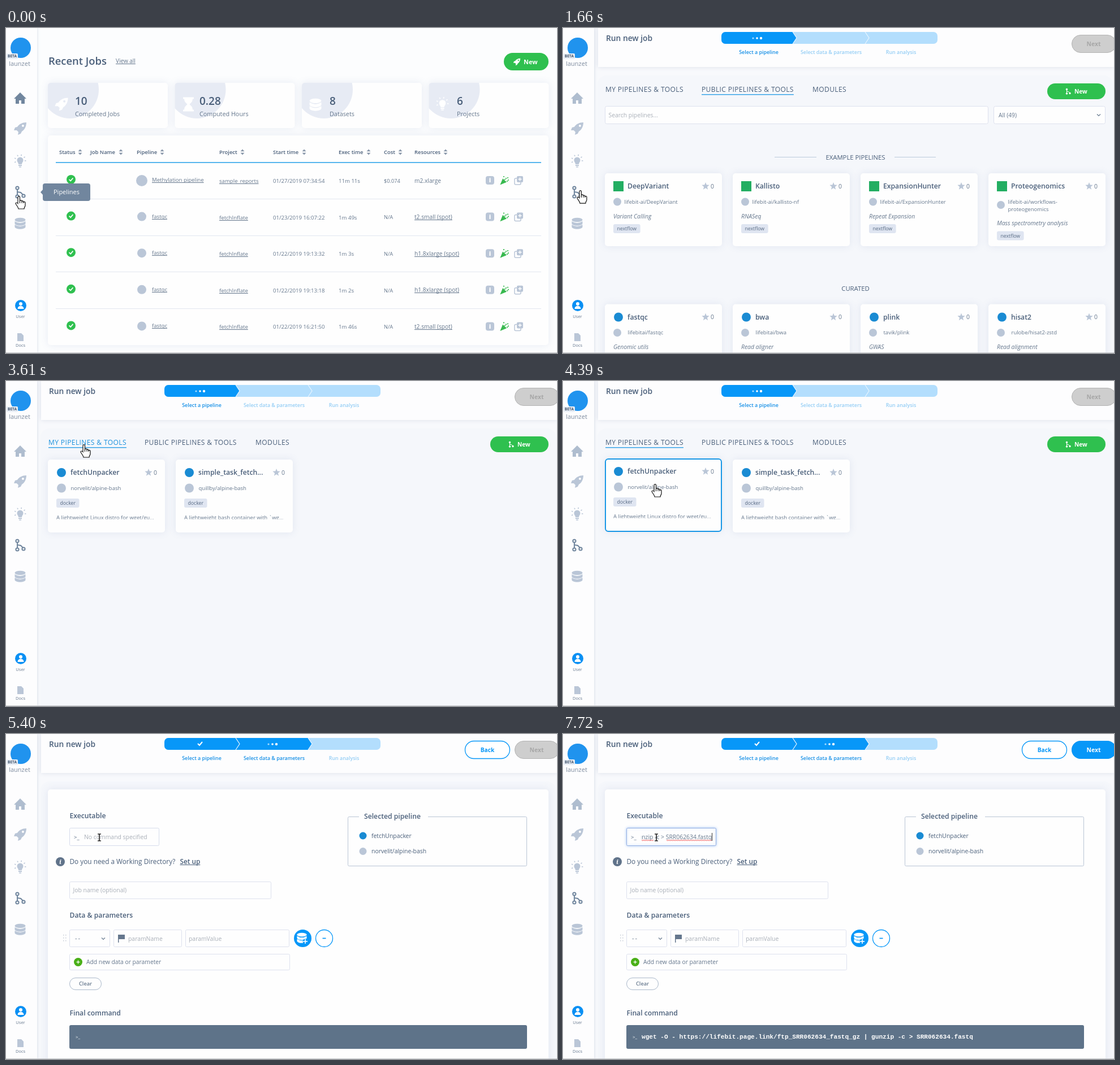
An HTML page with a canvas that plays this animation: 974 px wide and 575 px high, repeating every 8 s.

```html
<!DOCTYPE html>
<html lang="en">
<head>
<meta charset="utf-8">
<title>Run new job</title>
<style>
html, body { margin: 0; width: 100%; height: 100%; overflow: hidden; background: #fff; }
canvas { display: block; width: 974px; height: 575px; }
</style>
</head>
<body>
<canvas id="stage" width="974" height="575"></canvas>
<script>
const ctx = document.getElementById('stage').getContext('2d');
const LOOP = 8000;
const BLUE = '#0797f8', PALE_BLUE = '#b3defd', GREEN = '#2fc04f', INK = '#4a5f7a',
  BODY = '#65778d', LIGHT = '#bac6d7', DARK = '#71869e', HINT = '#a9afb8', EDGE = '#dde1ee';

const clamp = v => Math.max(0, Math.min(1, v));
const mix = (a, b, p) => a + (b - a) * p;
// Screen updates arrive in n even steps: 1/n at start, 1 at end.
const steps = (t, start, end, n) => t < start ? 0 :
  clamp((Math.floor((t - start) / (end - start) * (n - 1) + 0.1) + 1) / n);

function text(s, x, y, size, color, o = {}) {
  ctx.font = `${o.italic ? 'italic ' : ''}${o.weight || 400} ${size}px ${o.family || '"Open Sans", sans-serif'}`;
  ctx.letterSpacing = (o.spacing || 0) + 'px';
  ctx.textAlign = o.align || 'left';
  ctx.fillStyle = color;
  const base = y + size * 0.36;
  ctx.fillText(s, x, base);
  const w = ctx.measureText(s).width;
  if (o.underline) rect(x, Math.round(base + 1), w, 1, color);
  ctx.letterSpacing = '0px';
  return w;
}
function rect(x, y, w, h, color) {
  ctx.fillStyle = color;
  ctx.fillRect(x, y, w, h);
}
function box(x, y, w, h, r, fill, stroke, width = 1) {
  ctx.beginPath();
  ctx.roundRect(x, y, w, h, r);
  if (fill) { ctx.fillStyle = fill; ctx.fill(); }
  if (stroke) { ctx.strokeStyle = stroke; ctx.lineWidth = width; ctx.stroke(); }
}
function disc(x, y, r, fill, stroke, width = 1) {
  ctx.beginPath();
  ctx.arc(x, y, r, 0, 7);
  if (fill) { ctx.fillStyle = fill; ctx.fill(); }
  if (stroke) { ctx.strokeStyle = stroke; ctx.lineWidth = width; ctx.stroke(); }
}
function line(color, width, ...pts) {
  ctx.beginPath();
  for (let i = 0; i < pts.length; i += 2) ctx.lineTo(pts[i], pts[i + 1]);
  ctx.strokeStyle = color;
  ctx.lineWidth = width;
  ctx.stroke();
}
function place(x, y, scale, draw) {
  ctx.save();
  ctx.translate(x, y);
  ctx.scale(scale, scale);
  draw();
  ctx.restore();
}
function faded(alpha, draw) {
  if (alpha <= 0) return;
  ctx.save();
  ctx.globalAlpha *= clamp(alpha);
  draw();
  ctx.restore();
}
function card(x, y, w, h, r = 5) {
  ctx.save();
  ctx.shadowColor = 'rgba(90,115,170,.13)';
  ctx.shadowBlur = 14;
  box(x, y, w, h, r, '#fefefe');
  ctx.restore();
}

const shapes = {
  home: new Path2D('M0-10L11 1H8V10H2V4H-2V10H-8V1H-11Z'),
  rocket: new Path2D('M11-11C4-11-2-8-5-3L-9-2-11 3-6 3-3 6-4 11 1 9 3 5C8 2 11-4 11-11ZM5-7a2 2 0 1 1-.1 0Z'),
  bulb: new Path2D('M-5.5-2a5.5 5.5 0 1 1 11 0C5.5 1 3 2 3 5H-3C-3 2-5.5 1-5.5-2ZM-3 6H3V8H-3ZM-2 9H2V10.5H-2Z'),
  glass: new Path2D('M-9-12H9V-9H7C7-3 3-2 2 0 3 2 7 3 7 9H9V12H-9V9H-7C-7 3-3 2-2 0-3-2-7-3-7-9H-9Z'),
  doc: new Path2D('M-5-7H2L6-3V7H-5Z'),
  hand: new Path2D('M-2 1.5C-2-1 1.5-1 1.5 1.5V8C2 6.5 5 6.5 5 8.5 6 7.5 8 8 8 10 9.5 9 11 9.5 11 11V16C11 18 9 19 9 22H-1C-1 19-6 14-6 12.5-6 10.5-3.5 10.5-2 12.5Z'),
  cone: new Path2D('M-8 8L-3-4 4 3Z')
};
function icon(name, x, y, color, scale = 1) {
  place(x, y, scale, () => {
    ctx.fillStyle = color;
    ctx.fill(shapes[name], 'evenodd');
    if (name === 'bulb') {
      for (let a = -3.5; a < 0.5; a += 0.72) {
        const c = Math.cos(a), s = Math.sin(a);
        line(color, 1.5, c * 8, s * 8 - 2, c * 10.5, s * 10.5 - 2);
      }
    }
  });
}
function database(x, y, color, scale = 1) {
  place(x, y, scale, () => {
    ctx.fillStyle = color;
    for (const dy of [5, -1]) {
      ctx.beginPath();
      ctx.moveTo(-9.5, dy - 3);
      ctx.quadraticCurveTo(0, dy + 3, 9.5, dy - 3);
      ctx.lineTo(9.5, dy + 1);
      ctx.bezierCurveTo(8, dy + 6, -8, dy + 6, -9.5, dy + 1);
      ctx.fill();
    }
    ctx.beginPath();
    ctx.ellipse(0, -6.5, 9.5, 3.8, 0, 0, 7);
    ctx.fill();
  });
}
function branch(x, y, color, scale = 1) {
  place(x, y, scale, () => {
    line(color, 2, -5, -5, -5, 6);
    line(color, 2, -5, 0, 1, 1, 5, 5);
    for (const [a, b] of [[-5, -7], [-5, 8], [6, 7]]) disc(a, b, 2.6, '#fff', color, 2);
  });
}
function check(x, y, scale, color = '#fff') {
  place(x, y, scale, () => line(color, 2, -4, 0, -1, 3, 4, -3));
}
function star(x, y) {
  ctx.beginPath();
  for (let i = 0; i < 10; i++) {
    const r = i % 2 ? 3 : 7, a = i * Math.PI / 5 - Math.PI / 2;
    ctx.lineTo(x + r * Math.cos(a), y + r * Math.sin(a));
  }
  ctx.fillStyle = LIGHT;
  ctx.fill();
}
function dots(x) {
  [1.6, 1.8, 2.2].forEach((r, i) => disc(x + (i - 1) * 7, 18, r, i ? '#fff' : '#a9dcff'));
}
function chevronDown(x, y) { line('#697b90', 1.2, x - 3, y - 1.5, x, y + 1.5, x + 3, y - 1.5); }

function sidebar(onHome) {
  ctx.save();
  ctx.shadowColor = 'rgba(90,110,150,.25)';
  ctx.shadowBlur = 5;
  rect(0, 0, 55, 575, '#fdfdfe');
  ctx.restore();
  disc(26, 35, 18, '#2093ee');
  box(1, 45, 20, 10, 2, '#e9eef5');
  text('BETA', 11, 50, 6.5, '#43566e', { weight: 700, align: 'center' });
  text('launzet', 24, 63, 11, '#7d8b9e', { align: 'center' });
  icon('home', 25, 124, onHome ? DARK : '#afbdcf');
  icon('rocket', 25, 178, LIGHT);
  icon('bulb', 25, 236, LIGHT);
  branch(25, 290, DARK);
  database(25, 346, LIGHT);
  disc(26, 491, 10, '#0a90f4');
  disc(26, 488, 3, '#fff');
  ctx.beginPath();
  ctx.arc(26, 497, 5.5, Math.PI, 0);
  ctx.fillStyle = '#fff';
  ctx.fill();
  text('User', 25.5, 510, 7.5, BODY, { align: 'center' });
  icon('doc', 25, 547, LIGHT);
  text('Docs', 25.5, 561, 7.5, BODY, { align: 'center' });
}

function jobsPage() {
  rect(55, 0, 919, 575, '#fcfdfe');
  text('Recent Jobs', 75, 58, 18.4, INK, { weight: 600 });
  text('View all', 194, 58, 10, BODY, { underline: true });
  box(880, 44, 79, 31, 15.5, GREEN);
  icon('rocket', 903, 60, '#fff', 0.56);
  text('New', 915, 60, 11, '#fff', { weight: 700 });

  const stats = [['10', 'Completed Jobs', 122], ['0.28', 'Computed Hours', 342],
    ['8', 'Datasets', 572], ['6', 'Projects', 797]];
  stats.forEach(([value, label, tx], i) => {
    const x = 74 + i * 224.5;
    card(x, 97, 212, 80);
    ctx.save();
    ctx.beginPath();
    ctx.roundRect(x, 97, 212, 80, 5);
    ctx.clip();
    disc(x + 39, 109, 51, '#e7ebf4');
    ctx.restore();
    const ix = x + 24;
    if (i === 2) database(ix, 136, '#fff', 1.1);
    else icon(['rocket', 'glass', '', 'bulb'][i], ix, 135, '#fff', 1.05);
    text(value, tx, 129, 19, INK, { weight: 600 });
    text(label, tx, 152, 10.8, BODY);
  });

  card(74, 190, 885, 371);
  const heads = [['Status', 94, 131], ['Job Name', 149, 203], ['Pipeline', 231, 276], ['Project', 377, 418],
    ['Start time', 472, 527], ['Exec time', 588, 641], ['Cost', 668, 697], ['Resources', 722, 777]];
  for (const [label, x, sx] of heads) {
    text(label, x, 220, 9.4, INK, { weight: 600 });
    for (const d of [-1, 1]) {
      ctx.beginPath();
      ctx.moveTo(sx - 3.5, 219.5 + d * 1.2);
      ctx.lineTo(sx + 3.5, 219.5 + d * 1.2);
      ctx.lineTo(sx, 219.5 + d * 5);
      ctx.fillStyle = '#8695a8';
      ctx.fill();
    }
  }
  rect(88, 237, 858, 2, '#58b6ee');
  const rows = [['01/27/2019 07:34:54', '11m 11s', 'm2.xlarge'], ['01/23/2019 16:07:22', '1m 49s', 't2.small (spot)'],
    ['01/22/2019 19:13:32', '1m 3s', 'h1.8xlarge (spot)'], ['01/22/2019 19:13:18', '1m 2s', 'h1.8xlarge (spot)'],
    ['01/22/2019 16:21:50', '1m 46s', 't2.small (spot)']];
  rows.forEach(([date, time, machine], i) => {
    const y = 270 + i * 64.6, first = !i;
    if (i) rect(88, Math.round(y - 32.5), 858, 1, '#e2e7f0');
    disc(115, y - 2, 8, GREEN);
    check(115, y - 2, 0.85);
    disc(240, first ? y : y - 1, first ? 10 : 8, LIGHT);
    text(first ? 'Methylation pipeline' : 'fastqc', 258, y - 1.5, 9.6, BODY, { underline: true });
    text(first ? 'sample_reports' : 'fetchInflate', 377, y + 0.5, 9.6, BODY, { underline: true });
    text(date, 472, y + 0.5, 9.6, BODY);
    text(time, 588, y + 0.5, 9.6, BODY);
    text(first ? '$0.074' : 'N/A', 668, y + 0.5, 9.2, BODY);
    text(machine, 722, y, 10.2, BODY, { underline: !first });
    box(848, y - 8, 15, 15, 4, LIGHT);
    text('i', 855.5, y - 0.5, 11, '#fff', { weight: 800, align: 'center' });
    icon('cone', 881, y, '#38b94f', 0.95);
    for (let k = 0; k < 7; k++) disc(880 + k * 4 % 9, y - 7 + k * 3 % 10, 1.1, '#38b94f');
    box(899, y - 4, 11, 11, 2, null, LIGHT, 1.5);
    box(903, y - 8, 11, 11, 2, LIGHT);
    line('#fff', 1.5, 905.5, y - 2.5, 911.5, y - 2.5);
    line('#fff', 1.5, 908.5, y - 5.5, 908.5, y + 0.5);
  });
}
function tooltip() {
  box(65, 275, 84, 31, 4, DARK);
  ctx.beginPath();
  ctx.moveTo(65, 286);
  ctx.lineTo(61, 290.5);
  ctx.lineTo(65, 295);
  ctx.fill();
  text('Pipelines', 107, 290.5, 11, '#fff', { align: 'center' });
}

function wizardFrame(form, ready) {
  rect(55, 0, 919, 575, '#f8f9fc');
  box(61, 84, 911, 520, 16, '#f5f7fb');
  ctx.save();
  ctx.shadowColor = 'rgba(90,110,150,.18)';
  ctx.shadowBlur = 8;
  rect(62, 0, 912, 69, '#fdfdfe');
  ctx.restore();
  text('Run new job', 76, 18, 13.8, INK, { weight: 600 });

  const fill = clamp((form - 0.3) / 0.5);
  box(280, 7, 382, 21, 7, PALE_BLUE);
  const arrow = (left, right) => {
    ctx.beginPath();
    if (left === 280) ctx.roundRect(280, 7, 20, 21, [7, 0, 0, 7]);
    ctx.moveTo(left === 280 ? 290 : left, 7);
    for (const [x, y] of [[right, 7], [right + 7, 17.5], [right, 28], [left === 280 ? 290 : left, 28]]) ctx.lineTo(x, y);
    if (left !== 280) ctx.lineTo(left + 7, 17.5);
    ctx.fillStyle = BLUE;
    ctx.fill();
  };
  arrow(280, 406);
  faded(fill, () => arrow(406, 534));
  for (const x of [406, 534]) line('#e8f5ff', 1.2, x, 7, x + 7, 17.5, x, 28);
  if (form > 0) check(343, 17, mix(0.35, 1, clamp(form * 1.3 - 0.2)));
  else dots(343);
  faded((form - 0.1) * 1.8, () => dots(471));
  const label = (s, x, color) => text(s, x, 42.5, 8.9, color, { weight: 600, align: 'center' });
  label('Select a pipeline', 346, '#148fe6');
  label('Select data & parameters', 474, form > 0 ? '#148fe6' : '#93cdf5');
  label('Run analysis', 597.5, '#93cdf5');

  if (form > 0) {
    faded(form * 8 / 3, () => {
      box(811.5, 12.5, 79, 31, 15.5, '#fff', BLUE, 1.3);
      text('Back', 851, 28, 10.2, BLUE, { weight: 700, align: 'center' });
    });
  }
  box(899.5, 12.5, 78, 31, 15.5, '#cecece', '#b4b4b4');
  text('Next', 938, 28, 10.4, '#a7a7a7', { weight: 700, align: 'center' });
  faded(ready, () => {
    box(899, 12, 79, 32, 16, BLUE);
    text('Next', 938, 28, 10.4, '#fff', { weight: 700, align: 'center' });
  });
}

function tabs(active, hoverMine) {
  const list = [['MY PIPELINES & TOOLS', 75], ['PUBLIC PIPELINES & TOOLS', 245], ['MODULES', 441]];
  list.forEach(([s, x], i) => {
    const w = text(s, x, 109, 12, !i && hoverMine ? '#1b91dd' : INK, { spacing: 0.4 });
    if (i === active) rect(x, 117, w, 1.5, '#3aa5e8');
  });
  box(856, 98, 103, 28, 14, GREEN);
  branch(893, 112, '#fff', 0.5);
  text('New', 904, 112, 10.2, '#fff', { weight: 700 });
}
function badge(s, x, y) {
  ctx.font = '8.7px "Open Sans", sans-serif';
  box(x, y - 8, ctx.measureText(s).width + 13, 16, 3, '#dfe5f1');
  text(s, x + 6.5, y, 8.7, '#586b84');
}
function cardHead(x, y, title) {
  text(title, x + 40, y + 23, 12.2, INK, { weight: 600 });
  star(x + 178, y + 23);
  text('0', x + 187, y + 23, 10.4, BODY);
}

const examples = [['DeepVariant', ['lifebit-ai/DeepVariant'], 'Variant Calling'],
  ['Kallisto', ['lifebit-ai/kallisto-nf'], 'RNASeq'],
  ['ExpansionHunter', ['lifebit-ai/ExpansionHunter'], 'Repeat Expansion'],
  ['Proteogenomics', ['lifebit-ai/workflows-', 'proteogenomics'], 'Mass spectrometry analysis']];
const curated = [['fastqc', ['lifebitai/fastqc'], 'Genomic utils'], ['bwa', ['lifebitai/bwa'], 'Read aligner'],
  ['plink', ['tavik/plink'], 'GWAS'], ['hisat2', ['rulobe/hisat2-zstd'], 'Read alignment']];
function toolCard([title, path, kind], i, y, isExample) {
  const x = 74 + i * 226, extra = (path.length - 1) * 12.5;
  card(x, y, 207, 129);
  if (isExample) rect(x + 15, y + 14, 18, 18, '#23ae62');
  else disc(x + 24, y + 23, 8, '#1a8bd3');
  disc(x + 22, y + 50.5 + extra / 2.3, 7, LIGHT);
  cardHead(x, y, title);
  path.forEach((s, k) => text(s, x + (isExample ? 34.5 : 40.5), y + 50.5 + k * 13.5, 9.5, BODY));
  text(kind, x + 15, y + 76 + extra, 10.4, BODY, { italic: true });
  if (isExample) badge('nextflow', x + 15, y + 98 + extra);
}
function publicPage(hoverSearch) {
  box(74.5, 138.5, 677, 31, 3, '#fefefe', hoverSearch ? '#b5c7e6' : EDGE);
  text('Search pipelines...', 80.5, 154.5, 10.4, HINT);
  box(761.5, 138.5, 197, 31, 3, '#fefefe', EDGE);
  text('All (49)', 770, 154.5, 10.2, BODY);
  chevronDown(947, 154);
  text('EXAMPLE PIPELINES', 517, 229, 11.3, INK, { align: 'center' });
  rect(374, 228, 74, 1, '#bccbdb');
  rect(586, 228, 73, 1, '#bccbdb');
  text('CURATED', 517, 461, 11.3, INK, { align: 'center' });
  examples.forEach((item, i) => toolCard(item, i, 257, true));
  curated.forEach((item, i) => toolCard(item, i, 488.5, false));
}
function ownCard(x, title, path, note, hover) {
  const y = hover ? 137 : 139;
  card(x, y, 207, 129);
  if (hover) box(x + 1, y + 1, 205, 128, 5, null, '#1897e6', 2);
  disc(x + 24, y + 23, 8, '#1a8bd3');
  disc(x + 24, y + 50.5, 8, LIGHT);
  cardHead(x, y, title);
  text(path, x + 40.5, y + 51, 9.5, BODY);
  badge('docker', x + 15, y + 77);
  ctx.save();
  ctx.beginPath();
  ctx.rect(x, y + 90, 207, 15.5);
  ctx.clip();
  text(note, x + 15, y + 102.5, 9.5, BODY);
  ctx.restore();
}
function ownPage(hover) {
  ownCard(74, 'fetchUnpacker', 'norvelit/alpine-bash', 'A lightweight Linux distro for wget/gu...', hover);
  ownCard(300, 'simple_task_fetch...', 'quillby/alpine-bash', 'A lightweight bash container with `wg...', false);
}

function redWave(x1, x2, y) {
  const pts = [];
  for (let x = x1, k = 0; x <= x2; x += 1.5, k++) pts.push(x, y + (k % 2 ? 0.8 : -0.6));
  line('#ee4343', 1, ...pts);
}
function executable(t, ready) {
  const focus = steps(t, 6040, 6390, 5);
  ctx.save();
  ctx.shadowColor = `rgba(70,140,235,${focus * 0.45})`;
  ctx.shadowBlur = 4 * focus;
  box(112.5, 166.5, 158, 31, 2, '#fefefe', `rgb(${mix(214, 150, focus)},${mix(220, 176, focus)},${mix(236, 226, focus)})`);
  ctx.restore();
  text('>_', 120, 182.5, 9.5, '#586b83');
  if (!ready) {
    text('No command specified', 138, 182.5, 10.4, HINT);
  } else {
    ctx.save();
    ctx.beginPath();
    ctx.rect(138, 168, 126, 29);
    ctx.clip();
    text('gunzip -c > SRR062634.fastq', 263, 182.5, 10.4, BODY, { align: 'right' });
    redWave(139, 161, 188);
    redWave(183, 263, 188);
    ctx.restore();
  }
  const blinkOff = t >= 6720 && t < 7260;
  if (focus && !blinkOff) rect(ready ? 263 : 139, 175, 1, 14, '#333');
}
function formPage(t, form, ready) {
  card(74, 98, 885, 500);
  const title = (s, x, y) => text(s, x, y, 12.2, INK, { weight: 600 });
  title('Executable', 112.5, 145);
  executable(t, ready);
  disc(96, 226, 8, '#60738a');
  text('i', 96, 226, 11, '#fff', { weight: 700, italic: true, align: 'center', family: '"Noto Serif", serif' });
  text('Do you need a Working Directory?', 112.5, 226, 11.8, INK);
  text('Set up', 307.5, 226, 11.8, INK, { weight: 600, underline: true });
  box(112.5, 261.5, 356, 30, 2, '#fefefe', EDGE);
  text('Job name (optional)', 118.5, 276.5, 10.4, HINT);
  title('Data & parameters', 112.5, 321);

  faded((form - 0.15) / 0.85, () => {
    for (let i = 0; i < 6; i++) rect(101 + i % 2 * 4, 355 + (i >> 1) * 5, 1.5, 1.5, '#c5cbd5');
    for (const [x, w] of [[112.5, 71], [190.5, 120], [317.5, 183]]) box(x, 346.5, w, 30, 2, '#fefefe', EDGE);
    text('--', 122, 361.5, 11, BODY, { spacing: 2 });
    chevronDown(172, 362);
    rect(198, 355, 1.5, 14, '#65778d');
    rect(199, 355, 11, 8, '#65778d');
    text('paramName', 216, 362, 10.4, HINT);
    text('paramValue', 323, 362, 10.4, HINT);
    disc(524.5, 361.5, 15.5, BLUE);
    database(523, 361, '#fff', 0.9);
    disc(529, 367, 4.5, BLUE);
    line('#fff', 1.6, 525, 367, 533, 367);
    line('#fff', 1.6, 529, 363, 529, 371);
    disc(562.5, 361.5, 15, '#fff', BLUE, 1.3);
    line(BLUE, 1.7, 559.5, 361.5, 565.5, 361.5);
  });

  box(112.5, 389.5, 389, 28, 2, '#fefefe', EDGE);
  disc(127.5, 403.5, 7.5, '#49af16');
  line('#fff', 1.3, 124.5, 403.5, 130.5, 403.5);
  line('#fff', 1.3, 127.5, 400.5, 127.5, 406.5);
  text('Add new data or parameter', 142, 403.5, 10.3, BODY);
  box(112.5, 431.5, 56, 21, 10.5, '#fefefe', '#aab8ca');
  text('Clear', 140.5, 442, 9.2, BODY, { weight: 600, align: 'center' });
  title('Final command', 112.5, 494);
  box(112, 515, 809, 42, 3, '#5e7389');
  text('>_', 123, 536, 8, '#fff');
  faded(ready, () => text('wget -O - https://lifebit.page.link/ftp_SRR062634_fastq_gz | gunzip -c > SRR062634.fastq',
    139, 535.5, 11.1, '#fff', { weight: 700, family: '"Liberation Mono", monospace' }));

  box(604.5, 146.5, 316, 87, 2, null, '#b9c5d5');
  rect(624, 144, 122, 5, '#fefefe');
  title('Selected pipeline', 633, 146);
  disc(631, 180, 6.5, '#1a8bd3');
  disc(631, 207.5, 6.5, LIGHT);
  text('fetchUnpacker', 646, 180, 10.4, INK);
  text('norvelit/alpine-bash', 646, 207.5, 10.4, INK);
}

function pointerAt(t) {
  const a = steps(t, 1660, 2300, 9) ** 1.24;
  const b = clamp(steps(t, 2530, 2900, 6) * 1.2);
  const c = steps(t, 4090, 4390, 5);
  let x = mix(23, 144, a), y = mix(298, 146, a);
  if (b) { x = mix(144, 138, b); y = mix(146, 113, b); }
  if (c) { x = mix(138, 163, c); y = mix(113, 183, c); }
  return [x, y];
}
function pointer(x, y, beam) {
  if (beam) {
    line('#111', 1.5, x, y - 6, x, y + 6);
    for (const d of [-6, 6]) line('#111', 1.3, x - 3, y + d, x + 3, y + d);
    return;
  }
  ctx.save();
  ctx.translate(x, y);
  ctx.fillStyle = '#fff';
  ctx.fill(shapes.hand);
  ctx.strokeStyle = '#111';
  ctx.lineWidth = 1.2;
  ctx.stroke(shapes.hand);
  for (const fx of [1.5, 5, 8]) line('#111', 1, fx, 9, fx, 12);
  ctx.restore();
}

function render(t) {
  const open = steps(t, 810, 1190, 6), own = steps(t, 3230, 3610, 6);
  const form = steps(t, 4870, 5400, 8), ready = steps(t, 7510, 7720, 4);
  const [x, y] = pointerAt(t);
  const onSearch = open && !own && x > 74 && y > 138 && y < 170;

  if (!open) jobsPage();
  else {
    wizardFrame(form, ready);
    if (form) faded(form * 8 / 3, () => formPage(t, form, ready));
    else {
      faded(open, () => tabs(own ? 0 : 1, x > 74 && y < 120));
      if (own) faded(own, () => ownPage(y > 137));
      else faded(open, () => publicPage(onSearch));
    }
  }
  sidebar(!open);
  if (!open) tooltip();
  rect(0, 574, 974, 1, '#c6c8cb');

  if ([[500, 660], [3070, 3230], [4700, 4870]].some(([from, to]) => t >= from && t < to)) {
    disc(x, y, 13.5, null, '#222');
    disc(x, y, 12.5, null, '#fff');
  }
  pointer(form ? 165 : x, y, onSearch || form);
}

function tick(now) {
  render(now % LOOP);
  requestAnimationFrame(tick);
}
requestAnimationFrame(tick);
</script>
</body>
</html>
```
